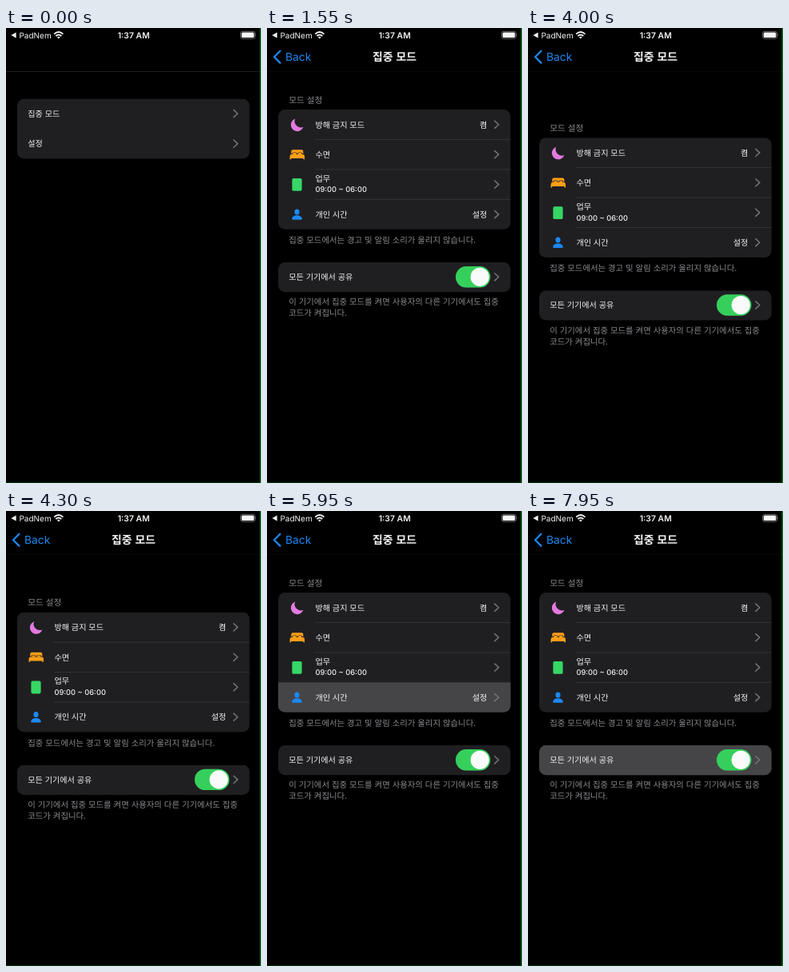
An HTML page that plays this animation: 319x569 px, repeating every 8000 ms.

```html
<!DOCTYPE html>
<html lang="ko">
<head>
<meta charset="utf-8">
<title>집중 모드</title>
<style>
  html, body { margin: 0; width: 100%; height: 100%; overflow: hidden; background: #000; }
  svg { display: block; width: 100vw; height: 100vh; }
  text {
    font-family: "Noto Sans CJK KR", "Noto Sans CJK", sans-serif;
    font-size: 10.15px; font-weight: 500; fill: #f4f4f5;
    text-rendering: geometricPrecision; white-space: pre;
  }
  .latin { font-family: Inter, "Noto Sans", sans-serif; }
  .note { font-size: 10.42px; font-weight: 400; fill: #8b8b90; }
  .end { text-anchor: end; }
  .mid { text-anchor: middle; }
  .card { fill: #1f1f21; }
  .pick { fill: #454547; }
  .line { stroke: #39393c; stroke-width: .8; }
  .chev { fill: none; stroke: #747478; stroke-width: 1.5; stroke-linecap: round; stroke-linejoin: round; }
  .blue { fill: #1c88f2; }
</style>
</head>
<body>
<svg viewBox="0 0 319 569" preserveAspectRatio="none">
  <defs>
    <clipPath id="view"><rect y="55" width="319" height="514"/></clipPath>
    <clipPath id="menuClip"><rect x="14" y="88.8" width="290.6" height="74.8" rx="8.5"/></clipPath>
    <clipPath id="modesClip"><rect x="14" y="102" width="290.6" height="149.8" rx="8.5"/></clipPath>
    <clipPath id="shareClip"><rect x="14" y="293" width="290.6" height="37.3" rx="8.5"/></clipPath>
    <path id="chevron" class="chev" d="M-2.2-4.6 2.8 0-2.2 4.6"/>
  </defs>

  <rect width="319" height="569"/>

  <g clip-path="url(#view)">
    <g id="menu">
      <g clip-path="url(#menuClip)">
        <rect class="card" x="14" y="88" width="291" height="76"/>
        <rect id="menuPick" class="pick" x="14" y="88" width="291" height="38.2"/>
      </g>
      <text x="27.2" y="110.8">집중 모드</text>
      <text x="27.2" y="148.3">설정</text>
      <use href="#chevron" x="287" y="107"/>
      <use href="#chevron" x="287" y="144.6"/>
    </g>

    <g id="page">
      <rect width="319" height="569"/>
      <g id="content">
        <text class="note" x="27.2" y="93.5" style="font-size:10.65px">모드 설정</text>
        <g clip-path="url(#modesClip)">
          <rect class="card" x="14" y="102" width="291" height="150"/>
          <g id="modePicks"></g>
          <g id="lines"></g>
        </g>

        <path fill="#e27ae0" d="M35.2 113.6A8 8 0 1 0 45.4 123.8 7.8 7.8 0 0 1 35.2 113.6Z"/>
        <g fill="#ff9f18">
          <path d="M30.3 157.2V154.2Q30.3 152.2 32.3 152.2H43.3Q45.3 152.2 45.3 154.2V157.2H43.9V156.6Q43.9 155.4 42.7 155.4H39.6Q38.4 155.4 38.4 156.6V157.2H37.2V156.6Q37.2 155.4 36 155.4H32.9Q31.7 155.4 31.7 156.6V157.2Z"/>
          <rect x="32.4" y="156" width="4.1" height="2" rx=".6"/>
          <rect x="39.1" y="156" width="4.1" height="2" rx=".6"/>
          <path d="M28.6 164.2V160.2Q28.6 157.9 30.9 157.9H44.7Q47 157.9 47 160.2V164.2H45.4V162.9H30.2V164.2Z"/>
        </g>
        <rect x="31.4" y="188" width="12.2" height="15.8" rx="1.8" fill="#36d765"/>
        <g class="blue">
          <ellipse cx="37.5" cy="229.9" rx="3.1" ry="3.5"/>
          <path d="M31.2 238.7C31.2 236.2 34 234.3 37.5 234.3S43.8 236.2 43.8 238.7Q43.8 239.8 42.6 239.8H32.4Q31.2 239.8 31.2 238.7Z"/>
        </g>

        <text x="60.4" y="124.7">방해 금지 모드</text>
        <text class="end" x="275.3" y="124.7">켬</text>
        <text x="60.4" y="162">수면</text>
        <text x="60.4" y="191.7">업무</text>
        <text class="latin" x="60.4" y="205.4" style="font-size:9.3px">09:00 ~ 06:00</text>
        <text x="60.4" y="236.9">개인 시간</text>
        <text class="end" x="275.3" y="236.9">설정</text>
        <g id="chevrons"></g>
        <text class="note" x="27.2" y="269">집중 모드에서는 경고 및 알림 소리가 울리지 않습니다.</text>

        <g clip-path="url(#shareClip)">
          <rect class="card" x="14" y="293" width="291" height="38"/>
          <rect id="sharePick" class="pick" x="14" y="293" width="291" height="38"/>
        </g>
        <text x="27.2" y="315">모든 기기에서 공유</text>
        <rect x="236" y="298.1" width="43.4" height="26.4" rx="13.2" fill="#787880" fill-opacity=".36"/>
        <rect id="track" x="236" y="298.1" width="43.4" height="26.4" rx="13.2" fill="#35d05b"/>
        <circle id="knob" cy="311.3" r="11.6" fill="#fafafa"/>
        <use href="#chevron" x="287" y="311.3"/>
        <text class="note" x="27.2" y="346.4">이 기기에서 집중 모드를 켜면 사용자의 다른 기기에서도 집중</text>
        <text class="note" x="27.2" y="360.4">코드가 켜집니다.</text>
      </g>
    </g>
  </g>

  <g id="navLine"><path d="M0 54.5H318" stroke="#1d1d1f" stroke-width="1"/></g>
  <path id="backArrow" d="M16.4 28.8 9 36.2 16.4 43.6" fill="none" stroke="#1c88f2" stroke-width="2.3" stroke-linecap="round" stroke-linejoin="round"/>
  <text id="backText" class="latin" x="23" y="41.2" style="font-size:13.8px;font-weight:400;fill:#1c88f2">Back</text>
  <text id="title" class="mid" x="159.5" y="41.2" style="font-size:13.9px;font-weight:700">집중 모드</text>

  <g fill="#f4f4f5">
    <path d="M6.4 9 12.6 5.6V12.4Z"/>
    <text class="latin" x="16.4" y="12.7" style="font-size:10px;font-weight:400">PadNem</text>
    <g fill="none" stroke="#f4f4f5" stroke-width="1.9">
      <path d="M60.2 7.6Q65.8 2.6 71.4 7.6"/>
      <path d="M62.3 10Q65.8 6.9 69.3 10"/>
    </g>
    <path d="M63.9 11.5Q65.8 9.9 67.7 11.5L65.8 13.5Z"/>
    <text class="latin mid" x="159.7" y="12.7" style="font-size:10.4px;font-weight:600">1:37 AM</text>
    <rect x="293.4" y="4.3" width="18.2" height="9" rx="2.7" fill="none" stroke="#858588" stroke-width=".8"/>
    <rect x="294.7" y="5.6" width="15.6" height="6.4" rx="1.5"/>
    <path d="M312.5 7.3Q313.8 8.8 312.5 10.3Z" fill="#858588"/>
  </g>

  <path d="M318.2 0V569" stroke="#0b7a1c" stroke-width="1.3"/>
  <path d="M0 568.6H318" stroke="#06450f" stroke-width=".8"/>
</svg>
<script>
  const LOOP = 8000, STEP = 50, ROW = 37.45, TOP = 102;
  const $ = id => document.getElementById(id);
  const rows = [0, 1, 2, 3];

  $("modePicks").innerHTML = rows.map(i =>
    `<rect class="pick" x="14" y="${TOP + i * ROW}" width="291" height="${ROW}"/>`).join("");
  $("lines").innerHTML = rows.slice(1).map(i =>
    `<path class="line" d="M60 ${TOP + i * ROW}H305"/>`).join("");
  $("chevrons").innerHTML = rows.map(i =>
    `<use href="#chevron" x="287" y="${TOP + (i + .5) * ROW}"/>`).join("");

  const picks = [...$("modePicks").children];
  const lines = [...$("lines").children];
  const pickTimes = [5100, 5350, 5600, 5950, 6400];

  const clamp = x => Math.max(0, Math.min(1, x));
  const mix = (a, b, p) => a + (b - a) * p;
  const smooth = (t, from, to) => {
    const p = clamp((t - from) / (to - from));
    return p * p * (3 - 2 * p);
  };
  // Share of the way left for a critically damped spring
  const spring = (ms, rate) => {
    const x = Math.max(0, ms) / 1000 * rate;
    return (1 + x) * Math.exp(-x);
  };
  const move = (el, x, y = 0) => el.setAttribute("transform", `translate(${x} ${y})`);
  const fade = (el, a) => el.setAttribute("opacity", a);

  function scrollAt(t) {
    if (t < 3500 || t >= 4800) return 0;
    if (t < 4200) return mix(-41.6, 35.2, smooth(t, 3500, 4000));
    return 35.2 * spring(t - 4200, 11);
  }

  function drawPush(t) {
    const p = t >= 1550 ? 1 : 1 - spring(t - 970, 12);
    move($("menu"), -96 * p);
    fade($("menu"), 1 - .2 * p);
    fade($("menuPick"), t >= 1000 ? 1 : 0);
    move($("page"), 319 * (1 - p));
    fade($("navLine"), 1 - .7 * p);
    fade($("backArrow"), p);
    move($("backText"), 110 * (1 - p));
    fade($("backText"), p);
    move($("title"), 160 * (1 - p));
    fade($("title"), p);
  }

  function drawPicks(t) {
    const picked = pickTimes.filter(start => t >= start).length - 1;
    picks.forEach((el, i) => fade(el, i === picked ? 1 : 0));
    lines.forEach((el, i) => fade(el, i === picked || i + 1 === picked ? 0 : 1));
    fade($("sharePick"), picked === 4 ? 1 : 0);
  }

  function drawToggle(t) {
    const on = 1 - smooth(t, 6860, 7260) + smooth(t, 7330, 7730);
    $("knob").setAttribute("cx", mix(249.2, 266.2, on));
    fade($("track"), on);
  }

  function draw(t) {
    drawPush(t);
    move($("content"), 0, scrollAt(t));
    drawPicks(t);
    drawToggle(t);
  }

  const begin = performance.now();
  function tick() {
    const t = (performance.now() - begin) % LOOP;
    draw(Math.floor(t / STEP) * STEP);
    requestAnimationFrame(tick);
  }
  tick();
</script>
</body>
</html>
```
